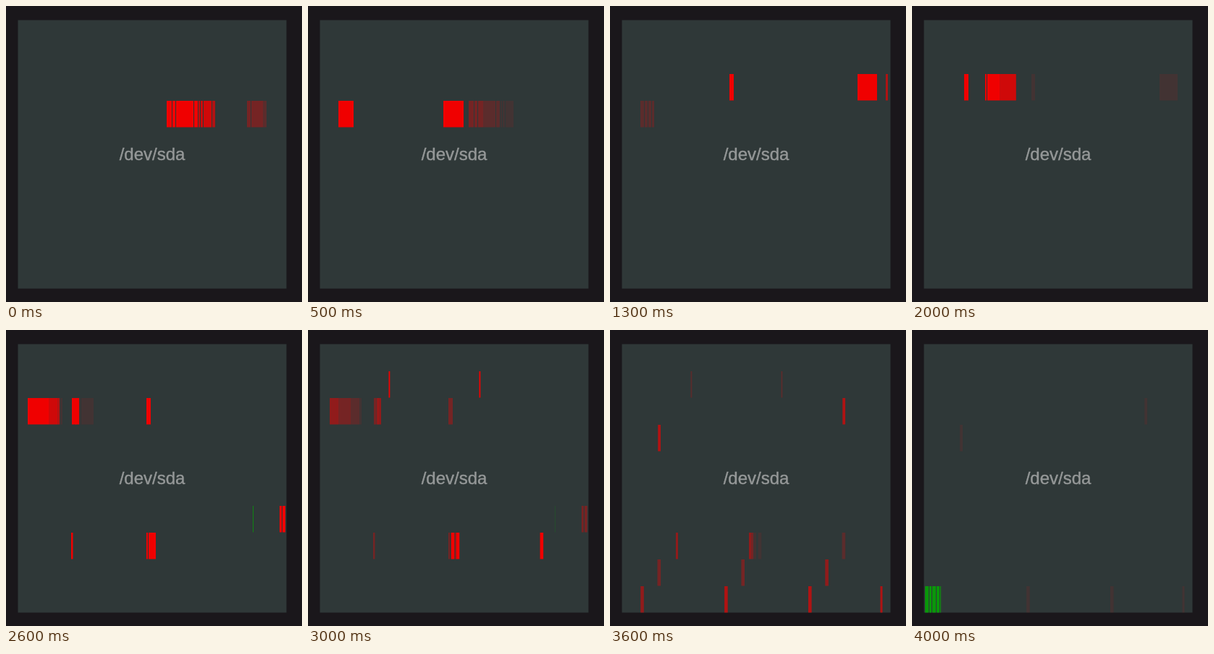
Animation, 409 px wide and 409 px high, one loop 4100 ms. Source, as an HTML page with a canvas:

```html
<!DOCTYPE html>
<html lang="en">
<head>
<meta charset="utf-8">
<title>Disk activity</title>
<style>
  html, body { margin: 0; width: 100%; height: 100%; overflow: hidden; background: #1a171b; }
  canvas { display: block; }
</style>
</head>
<body>
<canvas id="stage" width="409" height="409"></canvas>
<script>
const ctx = document.getElementById('stage').getContext('2d');
const LOOP = 4100, STEP = 100;
const SIDE = 371, LEFT = 16.5, TOP = 19.5, ROW = SIDE / 10;
const WRITE = '#f00000', READ = '#0a960a';
const HOLD = 100, FADE = 700;

let seed = 7;
function random() {
  seed = seed * 16807 % 2147483647;
  return seed / 2147483647;
}

const blocks = [];
const toStep = time => Math.ceil(time / STEP) * STEP;
const add = (row, born, x, w, color = WRITE) =>
  blocks.push({ row, born: toStep(born), x, w, color });

// A run of strips written from right to left, with occasional gaps
function burst(row, start, x, width, { time = 0, gap = 0, color = WRITE } = {}) {
  const end = x + width;
  for (let at = x; at < end;) {
    const w = Math.min(2 + Math.floor(random() * 4), end - at);
    add(row, start + time * (end - at - w) / width, at, w, color);
    at += w + (random() < gap ? 1 : 0);
  }
}

// Evenly spaced writes that wrap from row to row
function stride(row, start, x, { count = 2, pitch = 115.9, delay = 0, width = 4 } = {}) {
  for (let k = 0; k < count; k++) {
    const pos = x - LEFT + pitch * k;
    add(row + Math.floor(pos / SIDE), start + delay * k, LEFT + pos % SIDE, width);
  }
}

// Two heads move left through the middle rows
burst(3, -600, 333, 27, { time: 100, gap: 0.5 });
burst(3, -300, 222, 67, { time: 300, gap: 0.5 });
burst(3, 400, 187, 28, { time: 100 });
burst(3, 500, 42, 21);
burst(3, 700, 42, 20, { gap: 0.6 });
burst(2, 1000, 381, 3);
burst(2, 1200, 342, 27, { time: 100 });
burst(2, 1200, 165, 6, { time: 100 });
burst(2, 1700, 101, 43, { time: 200, gap: 0.1 });
burst(2, 1900, 72, 6);
burst(2, 2300, 30, 44, { time: 300 });

// Scattered writes
stride(2, 2500, 91, { pitch: 103, width: 6 });
burst(2, 2600, 96, 5);
burst(7, 2500, 194, 13, { gap: 0.5 });
burst(7, 2500, 90, 2.5);
burst(6, 2500, 378, 8, { gap: 0.8 });
add(6, 2400, 341, 1, READ);

// Regular writes across the end of the disk
burst(7, 2900, 192, 10, { time: 400 });
stride(7, 2900, 204.7, { count: 8, delay: 55, width: 4.6 });
stride(1, 3000, 111.5, { pitch: 125, width: 1.8 });
stride(2, 3300, 321.3, { width: 3.8 });
burst(7, 3200, 91, 3);
burst(9, 3300, 373.5, 3);
burst(9, 3900, 18, 22, { gap: 0.6, color: READ });

function draw(t) {
  ctx.globalAlpha = 1;
  ctx.fillStyle = '#1a171b';
  ctx.fillRect(0, 0, 409, 409);
  ctx.fillStyle = '#2f3838';
  ctx.fillRect(LEFT, TOP, SIDE, SIDE);

  for (const b of blocks) {
    const age = t - b.born;
    if (age < 0 || age >= HOLD + FADE) continue;
    ctx.globalAlpha = Math.min(1, 1 - (age - HOLD) / FADE) ** 1.2;
    ctx.fillStyle = b.color;
    ctx.fillRect(b.x, Math.round(TOP + 0.4 + ROW * b.row), b.w, 36.5);
  }

  ctx.globalAlpha = 1;
  ctx.fillStyle = ctx.strokeStyle = '#959898';
  ctx.lineWidth = 0.4;
  ctx.font = '24px "Liberation Sans", Arial, sans-serif';
  ctx.textAlign = 'center';
  ctx.fillText('/dev/sda', 202, 213);
  ctx.strokeText('/dev/sda', 202, 213);
}

const origin = performance.now();
function tick() {
  const t = (performance.now() - origin) % LOOP;
  draw(Math.floor(t / STEP) * STEP);
  requestAnimationFrame(tick);
}
tick();
</script>
</body>
</html>
```
